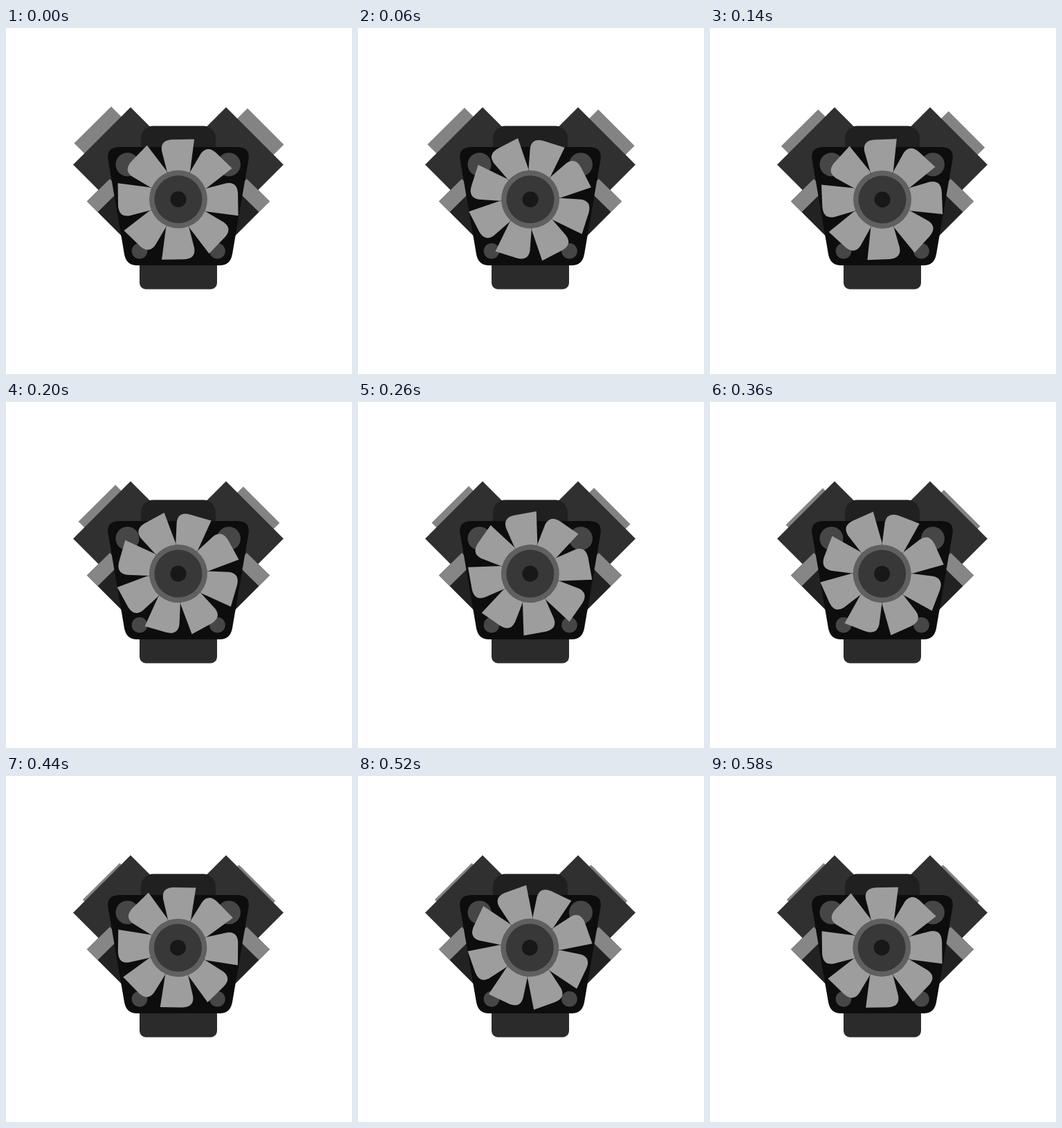
These frames come from a looping animation (500x500 px, 600 ms). An HTML page:

```html
<!DOCTYPE html>
<html lang="en">
<head>
<meta charset="utf-8">
<title>Engine</title>
<style>
  html, body { margin: 0; width: 100%; height: 100%; overflow: hidden; background: #fff; }
  svg { display: block; width: 100%; height: 100%; }
</style>
</head>
<body>
<svg viewBox="0 0 500 500">
  <defs>
    <g id="bank">
      <path fill="#303030" d="M180 114.5L97 197.5L180 280.5L263 197.5Z"/>
      <path fill="#222" d="M150 218L117 250.5L180 313.5L213 281Z"/>
      <path fill="#868686" d="M150 218L117 250.5L132.5 266L165.5 233.5Z"/>
    </g>
    <path id="blade" d="M0 0L-16 -41L-23.5 -70Q-26 -85.5 -9 -86.5L23.5 -87L17.5 -41Z"/>
  </defs>

  <path id="leftCap" fill="#838383" d="M152 113.5L98.5 166.5L128.5 196.5L182 143.5Z"/>
  <path id="rightCap" fill="#838383" d="M349 116L401.5 168.5L371.5 198.5L319 146Z"/>
  <use href="#bank"/>
  <use href="#bank" transform="matrix(-1 0 0 1 498 0)"/>

  <rect x="195" y="141.5" width="108" height="60" rx="18" fill="#202020"/>
  <rect x="193" y="320" width="112" height="57.5" rx="9" fill="#2b2b2b"/>
  <path fill="#0d0d0d" d="M164 172H334Q353 172 350.5 190L327 327Q324 343 309 343H189Q174 343 171 327L147.5 190Q145 172 164 172Z"/>
  <g fill="#464646">
    <circle cx="175.5" cy="197.3" r="17"/>
    <circle cx="322" cy="197.3" r="17"/>
    <circle cx="193" cy="322.3" r="11.3"/>
    <circle cx="305.5" cy="322.3" r="11.3"/>
  </g>

  <g id="fan">
    <g id="blades" fill="#9d9d9d"></g>
    <circle cx=".4" cy="-.2" r="42" fill="#606060"/>
    <circle cx=".4" cy="-.2" r="34.5" fill="#383838"/>
    <circle cx=".4" cy="-.2" r="11.5" fill="#181818"/>
  </g>
</svg>
<script>
const LOOP = 600, STEP = 20, LAST = LOOP / STEP - 1;
const TRAVEL = 12.3, TRAVEL_STEPS = 20;
const $ = id => document.getElementById(id);

$('blades').innerHTML = Array.from({ length: 8 }, (_, i) =>
  `<use href="#blade" transform="rotate(${i * 45})"/>`).join('');

function draw(now) {
  const step = Math.floor(now % LOOP / STEP);
  const push = TRAVEL * Math.min(1, step / TRAVEL_STEPS);
  $('fan').setAttribute('transform', `translate(248.6 247.75) rotate(${180 * step / LAST})`);
  $('leftCap').setAttribute('transform', `translate(${push} ${push})`);
  $('rightCap').setAttribute('transform', `translate(${-push} ${push})`);
}

const start = performance.now();
function tick() {
  draw(performance.now() - start);
  requestAnimationFrame(tick);
}
tick();
</script>
</body>
</html>
```
